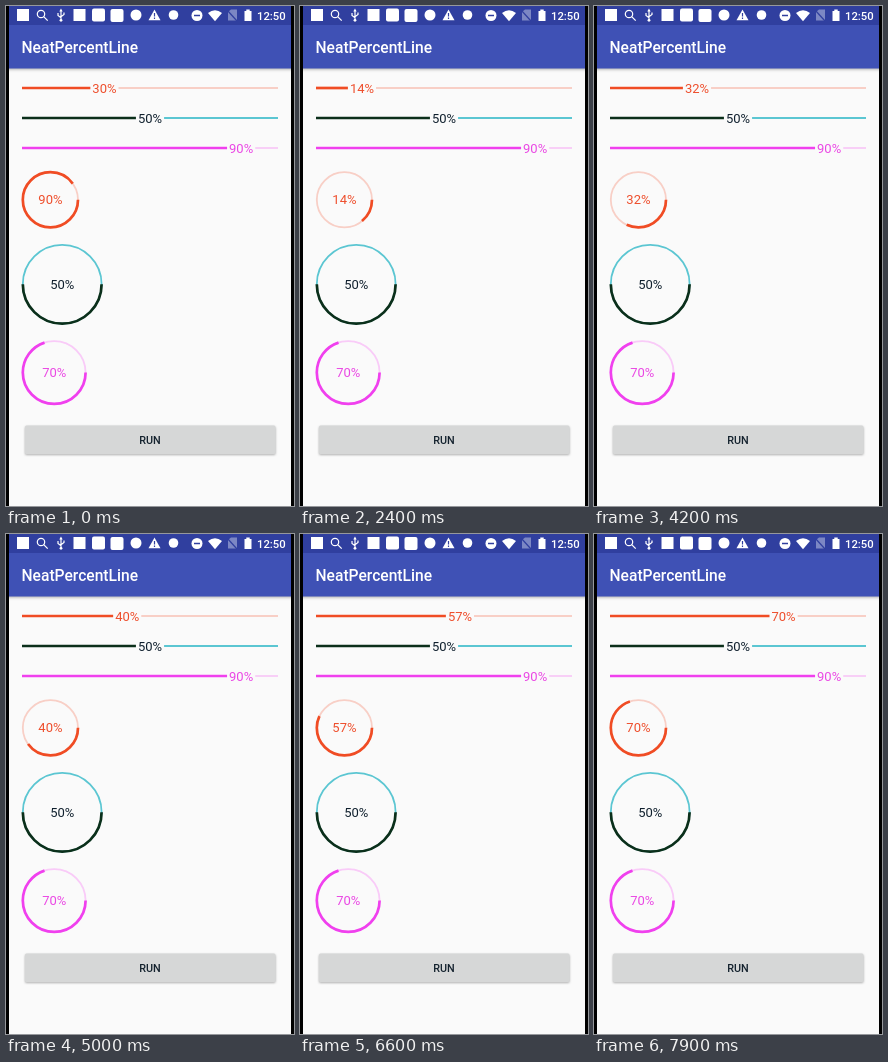
An HTML page that plays this animation: 288 by 500 pixels, repeating every 8 s.

```html
<!DOCTYPE html>
<html lang="en">
<head>
<meta charset="utf-8">
<title>Progress bars</title>
<style>
  html, body { margin: 0; width: 100%; height: 100%; overflow: hidden; background: #000; }
  svg { display: block; width: 288px; height: 500px; font-family: Roboto, sans-serif; }
  .bar { filter: drop-shadow(0 1.5px 1.5px rgba(0, 0, 0, .3)); }
  .button { filter: drop-shadow(0 1px 1px rgba(0, 0, 0, .3)); }
  .medium { font-weight: 500; }
  .label { font-size: 13px; }
  .mid { text-anchor: middle; }
  .rest { fill: none; stroke-width: 1.8; }
  .done { fill: none; stroke-width: 2.7; }
  .icons { fill: #fff; }
  .thin { fill: none; stroke: #fff; stroke-width: 1.2; }
</style>
</head>
<body>
<svg viewBox="0 0 288 500">
  <clipPath id="screen"><rect x="3" width="282" height="500"/></clipPath>
  <g clip-path="url(#screen)">
    <rect x="3" width="282" height="500" fill="#fafafa"/>
    <rect class="bar" x="-5" y="10" width="300" height="52.5" fill="#3f51b5"/>
    <rect x="3" width="282" height="19" fill="#303f9f"/>

    <g class="icons">
      <rect x="11" y="3" width="12" height="12"/>
      <g class="thin">
        <circle cx="35" cy="8" r="3.7"/>
        <path d="M37.7 10.7l4 4"/>
        <path d="M55 4v10M52 7v2.5l3 2.2M58 6.5v2l-3 2.2"/>
      </g>
      <path d="M53.3 5.5L55 2.5l1.7 3z"/>
      <circle cx="55" cy="14.3" r="1.4"/>
      <rect x="67.500" y="3" width="12" height="12"/>
      <rect x="86" y="2.500" width="13" height="13" rx="2"/>
      <rect x="104.500" y="3" width="13" height="13" rx="2"/>
      <circle cx="130" cy="9" r="5.500"/>
      <path d="M148.500 3.500l6 10.800h-12z"/>
      <path d="M148.500 7v3.600M148.500 11.600v1.400" stroke="#303f9f" stroke-width="1.200"/>
      <circle cx="167.500" cy="9" r="4.800"/>
      <circle cx="191" cy="9.500" r="5.500"/>
      <path d="M188 9.500h6" stroke="#303f9f" stroke-width="1.500"/>
      <path d="M202 7q7-5.500 14 0l-7 8.300z"/>
      <path d="M222 6l3-2.500h6v11h-9z" fill="#7c87c4"/>
      <path d="M221 4l10 11" stroke="#303f9f" stroke-width="1.200"/>
      <path d="M238.500 5h1.800v-1.500h3.400v1.500h1.800v10h-7z"/>
      <text class="medium" x="251" y="13.500" font-size="11.300">12:50</text>
    </g>

    <text class="medium" x="15.500" y="47" font-size="15.600" fill="#fff">NeatPercentLine</text>

    <g id="gauges"></g>

    <rect class="button" x="19" y="419.500" width="250.500" height="28.500" rx="1.500" fill="#d6d7d7"/>
    <text class="medium mid" x="144" y="437.800" font-size="10.800" fill="#14222e">RUN</text>
  </g>
</svg>
<script>
  const LEFT = 16, RIGHT = 272, GAP = 2, LOOP = 8000;
  const gauges = document.getElementById('gauges');

  const RED = { done: '#f04c24', rest: '#f8cfc6', text: '#ee4e2c' };
  const GREEN = { done: '#0b2f1a', rest: '#5bc6d2', text: '#10202e' };
  const PINK = { done: '#f040ee', rest: '#f9cbf8', text: '#ea48e4' };

  function add(tag, attrs) {
    const el = document.createElementNS('http://www.w3.org/2000/svg', tag);
    for (const key in attrs) el.setAttribute(key, attrs[key]);
    return gauges.appendChild(el);
  }

  function makeLine(y, color) {
    const rest = add('path', { class: 'rest', stroke: color.rest });
    const done = add('path', { class: 'done', stroke: color.done });
    const label = add('text', { class: 'label', y: y + 4.6, fill: color.text });
    return value => {
      label.textContent = value + '%';
      const gap = label.getComputedTextLength() + 2 * GAP;
      const end = LEFT + (RIGHT - LEFT - gap) * value / 100;
      label.setAttribute('x', end + GAP);
      done.setAttribute('d', `M${LEFT} ${y}H${end}`);
      rest.setAttribute('d', `M${end + gap} ${y}H${RIGHT}`);
    };
  }

  function makeRing(cx, cy, r, color) {
    const ring = { cx, cy, r, pathLength: 100 };
    add('circle', { ...ring, class: 'rest', stroke: color.rest });
    const done = add('circle', { ...ring, class: 'done', stroke: color.done });
    const label = add('text', { class: 'label mid', x: cx, y: cy + 4.4, fill: color.text });
    return value => {
      label.textContent = value + '%';
      done.setAttribute('stroke-dasharray', `${value} 100`);
    };
  }

  const setLine = makeLine(82, RED);
  makeLine(112, GREEN)(50);
  makeLine(142, PINK)(90);
  const setRing = makeRing(44.4, 193.8, 27.6, RED);
  makeRing(56.2, 278.3, 39.4, GREEN)(50);
  makeRing(48.2, 366.5, 31.4, PINK)(70);

  // One percent per tick, with a short stall and catch-up midway.
  function progress(tick) {
    if (tick < 55) return Math.max(0, tick - 10);
    return tick === 55 ? 44 : tick - 9;
  }

  let last = -1;
  function draw(now) {
    const tick = Math.floor((now % LOOP) / 100);
    if (tick !== last) {
      last = tick;
      const running = tick >= 9;
      setLine(running ? progress(tick) : 30);
      setRing(running ? progress(tick) : 90);
    }
    requestAnimationFrame(draw);
  }
  draw(0);
</script>
</body>
</html>
```
